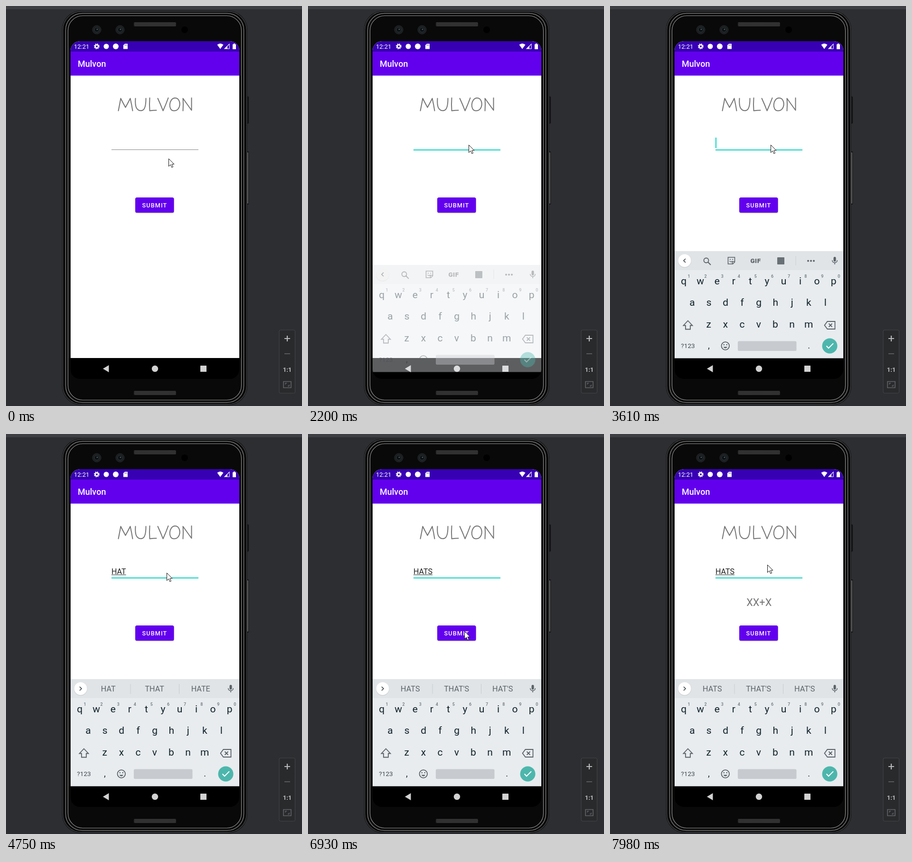
Animation, 623 px wide and 842 px high, one loop 8000 ms. Source, as an HTML page with a canvas:

```html
<!DOCTYPE html>
<html lang="en">
<head>
<meta charset="utf-8">
<title>Mulvon</title>
<style>
html, body { margin: 0; width: 100%; height: 100%; overflow: hidden; background: #2d2e32; }
canvas { display: block; }
</style>
</head>
<body>
<canvas id="stage" width="623" height="842" role="img" aria-label="MULVON word game on a phone"></canvas>
<script>
const ctx = document.getElementById('stage').getContext('2d');
const LOOP = 8000;
const PURPLE = '#6200ee', TEAL = '#0fd3c3', GREY = '#757575', ICON = '#596167';

// Each row: start time, then the value held until the next row.
const pointer = [
  [0, 342, 321], [120, 342, 314], [270, 340, 303], [390, 338, 292],
  [6410, 342, 326], [6530, 343, 373], [6670, 342, 398], [6810, 336, 411],
  [6930, 329, 415], [7830, 331, 292], [7980, 331, 275]
];
const typed = [[0, ''], [3730, 'H'], [3850, 'HA'], [4350, 'HAT'], [5150, 'HATS']];
const caret = [
  [0, 0], [640, 1], [1160, 0], [1690, 1], [2200, 0], [2570, 1], [3100, 0], [3610, 1],
  [4750, 0], [5150, 1], [5590, 0], [6130, 1], [6670, 0], [7170, 1], [7680, 0]
];
const hints = [
  [0, ''], [4100, 'HA HAHA HAVE'], [4350, 'HAT THAT HATE'], [5150, "HATS THAT'S HAT'S"]
];
const keyboard = [[0, 0, 0], [2200, 29, 0.4], [2320, 1.4, 0.87], [2450, 0, 1]];
const glow = [[0, 0], [7050, 0.2], [7170, 0.42], [7290, 0.42], [7410, 0.2], [7530, 0]];

const at = (track, t) => track.filter(row => row[0] <= t).pop().slice(1);

function paint(path, fill, stroke, width = 1) {
  if (fill) { ctx.fillStyle = fill; ctx.fill(path); }
  if (stroke) { ctx.strokeStyle = stroke; ctx.lineWidth = width; ctx.stroke(path); }
}
function box(x, y, w, h, r, fill, stroke, width) {
  const p = new Path2D();
  p.roundRect(x, y, w, h, r);
  paint(p, fill, stroke, width);
}
function disc(x, y, r, fill, stroke, width) {
  const p = new Path2D();
  p.arc(x, y, r, 0, Math.PI * 2);
  paint(p, fill, stroke, width);
}
function shape(d, x, y, fill, stroke, width) {
  ctx.save();
  ctx.translate(x, y);
  paint(new Path2D(d), fill, stroke, width);
  ctx.restore();
}
function text(s, x, y, size, color, align = 'center', weight = 400, spacing = 0) {
  ctx.font = `${weight} ${size}px Roboto, sans-serif`;
  ctx.letterSpacing = spacing + 'px';
  ctx.textAlign = align;
  ctx.fillStyle = color;
  ctx.fillText(s, x, y);
}

function speaker(y) {
  box(269, y, 89, 9, 2, '#292929');
  ctx.save();
  ctx.setLineDash([1, 1]);
  for (let i = 0; i < 4; i++) shape('M0 0H85', 271 + i % 2, y + 1.5 + i * 2, null, '#484848');
  ctx.restore();
}

function drawPhone() {
  ctx.fillStyle = '#2d2e32';
  ctx.fillRect(0, 0, 623, 842);
  ctx.fillStyle = '#3d3f43';
  ctx.fillRect(0, 0, 623, 7);

  box(506, 191, 4.5, 56, 1, '#17181a', '#0c0c0c');
  box(506, 306, 5, 112, 1, '#151515');
  box(508, 308, 1.6, 108, 1, '#777');

  box(118, 10, 390, 830, 40, '#080808');
  box(119.5, 11.5, 387, 827, 39, null, '#424344', 1.5);
  box(125.5, 15.5, 375, 819, 35, null, '#777877', 1.5);
  box(130.5, 20.5, 365, 809, 31, '#090909', '#929391', 1.2);

  speaker(34);
  speaker(810);
  for (const x of [191, 240]) {
    disc(x, 50, 9, '#1b1e20', '#25292b');
    disc(x, 50, 5, '#0c1013', '#30383c');
    disc(x + 1, 49, 1.5, '#4b565c');
  }
  disc(376, 50, 7, '#000');
}

function drawZoom() {
  box(575, 682, 33.5, 133, 3, '#292a2c', '#434548');
  shape('M-6 0H6M0 -6V6', 592, 700, null, '#b7b9bb', 2.2);
  shape('M-6 0H6', 592, 732, null, '#58595c', 2);
  text('1:1', 592, 770, 13, '#babcbe', 'center', 700);
  box(584, 790.5, 16, 13, 0, null, '#626468', 1.6);
  shape('M-4 0V-3H-1M4 0V3H1', 592, 797, null, '#626468', 1.3);
}

function drawStatus() {
  text('12:21', 143, 90, 13, '#fff', 'left');
  disc(191, 85, 3.3, null, '#fff', 2.6);
  ctx.save();
  ctx.setLineDash([2.2, 1.88]);
  disc(191, 85, 5.2, null, '#fff', 1.7);
  ctx.restore();
  disc(211, 85, 5.5, '#fff');
  disc(231, 85, 6, '#fff');
  shape('M3 0H9V11H0V3Z', 247, 79.5, '#fff');
  shape('M3 2V4M5 2V4M7 2V4', 247, 79.5, null, '#3700b3', 0.8);
  shape('M-6.5 -3Q0 -8 6.5 -3L0 6Z', 451, 84.5, '#fff');
  shape('M10 0V10H0Z', 460, 80, null, '#fff', 1.1);
  shape('M6 4V10H0Z', 460, 80, '#fff');
  shape('M0 1.5H2V0H5V1.5H7V12H0Z', 477, 79, '#fff');
}

function drawTitle() {
  ctx.save();
  ctx.lineCap = ctx.lineJoin = 'round';
  const letters = [
    'M0 27Q3 12 5 1Q10 11 15 20Q21 9 25 1Q28 14 30 27',
    'M36 1Q35 15 38 21Q43 29 51 26Q58 23 58 1',
    'M66 0Q65 14 66 27Q73 26 80 26',
    'M83 1Q89 14 94 27Q100 14 105 0',
    'M119 0C106 1 104 27 117 27C133 27 133 0 119 0',
    'M136 27Q137 13 136 1Q146 15 154 26Q154 13 154 0'
  ];
  for (const d of letters) shape(d, 236.5, 193.5, null, GREY, 2);
  ctx.restore();
}

function drawApp(t) {
  ctx.fillStyle = '#fff';
  ctx.fillRect(136, 74, 355, 667);
  ctx.fillStyle = '#3700b3';
  ctx.fillRect(136, 74, 355, 22);
  ctx.fillStyle = PURPLE;
  ctx.fillRect(136, 96, 355, 50.5);
  drawStatus();
  text('Mulvon', 151, 128, 18, '#fff', 'left', 500);
  drawTitle();

  const focused = t >= 520;
  ctx.fillStyle = focused ? TEAL : '#858585';
  ctx.fillRect(222, 302, 183, focused ? 2 : 1);

  const [word] = at(typed, t);
  text(word, 222, 294.5, 16.1, '#202020', 'left');
  const width = ctx.measureText(word).width;
  ctx.fillStyle = '#333';
  if (word) ctx.fillRect(222, 296, width, 1);
  ctx.fillStyle = TEAL;
  if (at(caret, t)[0]) ctx.fillRect(222 + Math.round(width), 277, 2, 22);

  if (t >= 7170) text('XX+X', 313.7, 362, 21.7, GREY);

  box(272, 404, 82, 32.5, 4, 'rgba(0,0,0,.2)');
  box(272, 403, 81.5, 32, 3.5, PURPLE);
  const [light] = at(glow, t);
  if (light) box(272, 403, 81.5, 32, 3.5, `rgba(255,255,255,${light})`);
  text('SUBMIT', 286.5, 424, 12.7, '#fff', 'left', 500, 1.13);
}

function drawNav() {
  ctx.fillStyle = '#000';
  ctx.fillRect(136, 741, 355, 44);
  shape('M0 0L12.5 -7.5V7.5Z', 204, 763.5, '#d2d2d2');
  disc(313.5, 763.5, 6.7, '#d2d2d2');
  box(409, 757, 13, 13, 0.5, '#d2d2d2');
}

function keyRow(keys, x, y) {
  [...keys].forEach((k, i) => text(k, x + i * 35.05, y, 21, '#10222a'));
}

function drawTools() {
  disc(202.5, 535.5, 5, null, ICON, 1.8);
  shape('M0 0L6 6', 206, 539, null, ICON, 2);
  shape('M-7 -7H7V3L3 7H-7Z M7 2H2V7', 255.5, 536, null, ICON, 1.6);
  disc(253, 533.5, 1.1, ICON);
  disc(258, 533.5, 1.1, ICON);
  shape('M-4 1Q-1 4 2 1', 255.5, 536, null, ICON, 1.3);
  text('GIF', 306.5, 541, 13.5, ICON, 'center', 900, 0.5);
  box(352, 529, 15, 15, 1, '#697176');
  ctx.fillStyle = '#cbd0d3';
  ctx.fillRect(390.5, 526, 1, 20);
  for (const x of [417, 423, 429]) disc(x, 536.5, 1.9, ICON);
}

function drawHints(words) {
  words.split(' ').forEach((w, i) => text(w, [215.3, 312.7, 409.7][i], 542, 16.2, '#5c656a'));
  ctx.fillStyle = '#c6cbce';
  ctx.fillRect(261.5, 526, 1, 21);
  ctx.fillRect(364, 526, 1, 21);
}

function drawKeyboard(t) {
  const [drop, alpha] = at(keyboard, t);
  if (!alpha) return;
  ctx.save();
  ctx.globalAlpha = alpha;
  ctx.translate(0, drop);
  ctx.fillStyle = '#e8ecef';
  ctx.fillRect(136, 556, 355, 185.5);
  ctx.fillStyle = '#e0e4e7';
  ctx.fillRect(136, 516, 355, 40);

  const [words] = at(hints, t);
  disc(157, 536.8, 14, 'rgba(0,0,0,.1)');
  disc(157, 536, 13.5, '#fff');
  shape(words ? 'M-2 -4L2 0L-2 4' : 'M2 -4L-2 0L2 4', 157, 536, null, '#3e474c', 1.7);
  if (words) drawHints(words); else drawTools();
  box(470.5, 528, 5, 10, 2.5, ICON);
  shape('M-5.3 -1C-5.3 6 5.3 6 5.3 -1M0 4.5V8', 473, 536, null, ICON, 1.5);

  keyRow('qwertyuiop', 155.2, 586);
  [...'1234567890'].forEach((n, i) => text(n, 166 + i * 35.1, 571.5, 9, '#68747a', 'center', 500));
  keyRow('asdfghjkl', 173, 631);
  keyRow('zxcvbnm', 207.8, 677);

  shape('M0 -9L9.5 1H5V9H-5V1H-9.5Z', 164, 671.5, null, ICON, 1.8);
  shape('M-11 0L-5 -8H11V8H-5Z', 462.5, 672, null, ICON, 1.8);
  shape('M-3.5 -3.5L3.5 3.5M3.5 -3.5L-3.5 3.5', 464, 672, null, ICON, 1.8);

  text('?123', 164, 720, 13.6, '#3d484e');
  text(',', 208, 721, 18, '#10222a');
  text('.', 418.5, 721, 18, '#10222a');
  disc(242.8, 715.5, 8.3, null, ICON, 1.8);
  disc(239.8, 713, 1.3, ICON);
  disc(245.8, 713, 1.3, ICON);
  shape('M-4.5 0Q0 6 4.5 0Z', 242.8, 717.5, ICON);
  box(269, 705.5, 123.5, 20.5, 2.5, '#c7cbcf');
  disc(462.5, 715.5, 16, '#4db6ac');
  shape('M-7 0L-2.5 4.8L7.5 -5.3', 462.5, 715.5, null, '#fff', 2);
  ctx.restore();
}

function drawPointer(t) {
  const [x, y] = at(pointer, t);
  shape('M0 0V16L3.8 12.5L6.4 18.3L9 17.2L6.4 11.5H11.5Z', x + 0.5, y + 0.5, '#fff', '#111', 1);
}

function frame(now) {
  const t = now % LOOP;
  drawPhone();
  drawZoom();
  ctx.save();
  ctx.beginPath();
  ctx.roundRect(136, 74, 355, 711, 20);
  ctx.clip();
  drawApp(t);
  drawNav();
  drawKeyboard(t);
  ctx.restore();
  drawPointer(t);
}

const start = performance.now();
function tick() {
  frame(performance.now() - start);
  requestAnimationFrame(tick);
}
tick();
</script>
</body>
</html>
```
